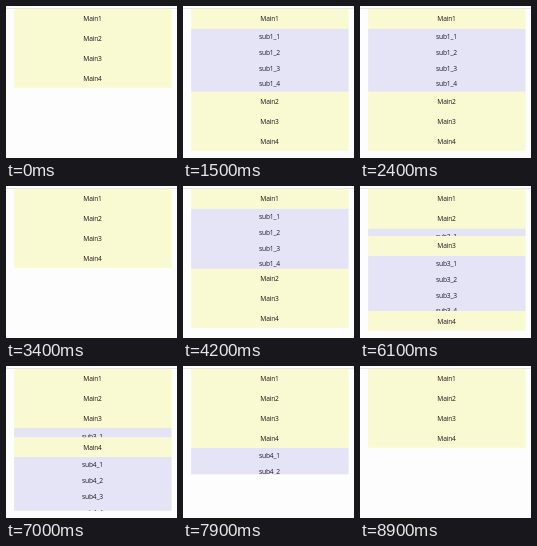
Recreate the animation shown at these times as an HTML page. Size 171 by 152 pixels, loop 9 s.

```html
<!DOCTYPE html>
<html lang="en">
<head>
<meta charset="utf-8">
<title>Accordion menu</title>
<style>
  html, body { margin: 0; width: 100%; height: 100%; overflow: hidden; background: #fefdfe; }
  svg { display: block; }
  svg svg { overflow: hidden; }
  text { font: 6.7px "Open Sans", "Noto Sans", sans-serif; letter-spacing: -0.2px; text-anchor: middle; fill: #20151a; }
  .sub text { fill: #1c1c26; }
</style>
</head>
<body>
<svg id="stage" width="171" height="152" viewBox="0 0 171 152">
  <rect width="171" height="2" fill="#fff"/>
  <rect y="2" width="171" height="1" fill="#e9e8e9"/>
</svg>
<script>
const LOOP = 9000, STEP = 100, SLIDE = 400;
const LEFT = 8.1, TOP = 3, WIDTH = 157.6;
const MAIN_H = 19.7, SUB_H = 15.75, PANEL_H = SUB_H * 4;
const YELLOW = "#fafad2", LAVENDER = "#e4e4f6";

// Each click opens one panel, closes another, or does both at once.
const clicks = [
  { at: 450, open: 0 },
  { at: 2400, close: 0 },
  { at: 3855, open: 0 },
  { at: 4872, close: 0, open: 1 },
  { at: 5790, close: 1, open: 2 },
  { at: 6700, close: 2, open: 3 },
  { at: 7680, close: 3 }
];

function add(parent, tag, attrs = {}, label = "") {
  const node = document.createElementNS("http://www.w3.org/2000/svg", tag);
  for (const key in attrs) node.setAttribute(key, attrs[key]);
  node.textContent = label;
  return parent.appendChild(node);
}

function addRow(parent, y, height, label) {
  add(parent, "text", { x: WIDTH / 2 - 0.4, y: y + height / 2 + 2.6 }, label);
}

const stage = document.getElementById("stage");
// One sheet behind all rows keeps fractional row edges free of seams.
const backdrop = add(stage, "rect", { x: LEFT, y: TOP, width: WIDTH, fill: YELLOW });
const sections = [1, 2, 3, 4].map(n => {
  const group = add(stage, "g");
  addRow(group, 0, MAIN_H, "Main" + n);
  const panel = add(group, "svg", { class: "sub", y: MAIN_H, width: WIDTH, height: 0 });
  add(panel, "rect", { width: WIDTH, height: PANEL_H, fill: LAVENDER });
  for (let k = 0; k < 4; k++) addRow(panel, k * SUB_H, SUB_H, `sub${n}_${k + 1}`);
  return { group, panel };
});

function swing(elapsed) {
  const p = Math.min(1, Math.max(0, elapsed / SLIDE));
  return 0.5 - Math.cos(p * Math.PI) / 2;
}

function draw(time) {
  const open = [0, 0, 0, 0];
  for (const click of clicks) {
    const amount = swing(time - click.at);
    if (click.open !== undefined) open[click.open] += amount;
    if (click.close !== undefined) open[click.close] -= amount;
  }
  let y = TOP;
  sections.forEach(({ group, panel }, i) => {
    const height = Math.max(0, open[i] * PANEL_H);
    group.setAttribute("transform", `translate(${LEFT} ${y})`);
    panel.setAttribute("height", height);
    y += MAIN_H + height;
  });
  backdrop.setAttribute("height", y - TOP);
}

const start = performance.now();
function tick() {
  const time = (performance.now() - start) % LOOP;
  draw(Math.floor(time / STEP) * STEP);
  requestAnimationFrame(tick);
}
tick();
</script>
</body>
</html>
```
